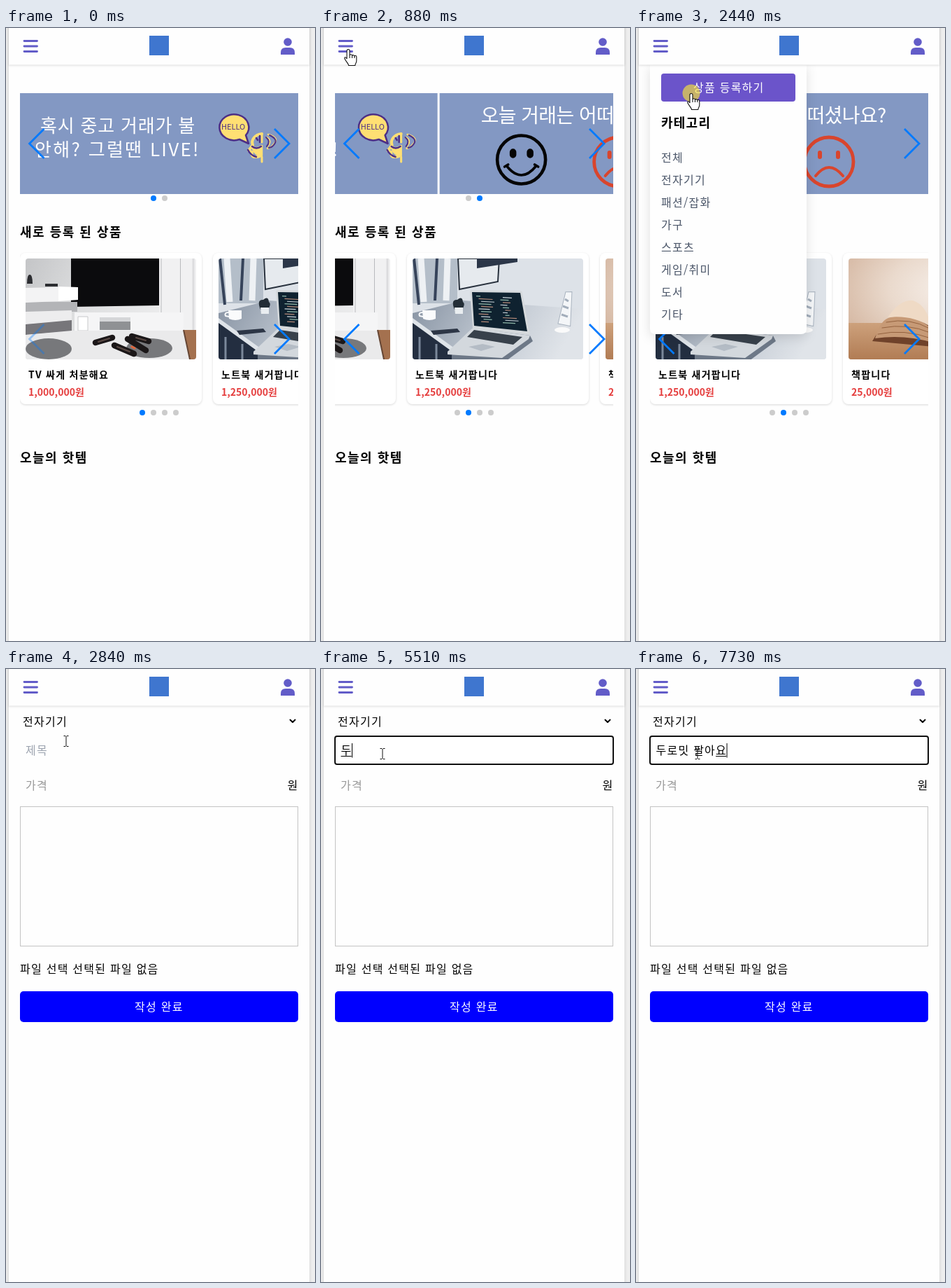
Animation, 442 px wide and 875 px high, one loop 8 s. Source, as an HTML page:

```html
<!DOCTYPE html>
<html lang="ko">
<head>
<meta charset="utf-8">
<title>중고 거래</title>
<style>
html, body { margin: 0; width: 100%; height: 100%; overflow: hidden; background: #efefef; }
svg { display: block; width: 100%; height: 100%; }
text { font: 16px "Noto Sans CJK KR", "Noto Sans KR", sans-serif; letter-spacing: 1.25px; white-space: pre; }
.head { font-size: 18px; font-weight: 700; }
.wide { letter-spacing: 1.5px; }
.title { font-size: 14px; font-weight: 700; }
.price { font-size: 14px; font-weight: 700; letter-spacing: 0; fill: #e53e3e; }
.items { fill: #4a5568; }
.pen { font-weight: 300; fill: #fff; }
.line { fill: none; stroke-linecap: round; stroke-linejoin: round; }
.arrow { fill: none; stroke: #007aff; stroke-width: 2.8; }
.card { filter: drop-shadow(0 1px 1.5px rgba(0, 0, 0, .15)); }
.page { filter: drop-shadow(0 0 3px rgba(0, 0, 0, .12)); }
.bar { filter: drop-shadow(0 1px 1.5px rgba(0, 0, 0, .14)); }
.sheet { filter: drop-shadow(0 4px 8px rgba(0, 0, 0, .12)); }

/* one loop is 8 s, so 1% is 80 ms */
.a { animation: 8s step-end infinite; }
.banners { animation-name: banners; }
.cards { animation-name: cards; }
.lose { animation-name: lose; }
.gain { animation-name: gain; }
.wake { animation-name: wake; }
.home { animation-name: home; }
.menu { animation-name: menu; }
.form { animation-name: form; }
.focus { animation-name: focus; }
.cursor { animation-name: move; animation-timing-function: ease-in-out; }
.ring { animation-name: ring; }
.tip { animation-name: tip; }
.hand { animation-name: hand; }
.beam { animation-name: form; }
@keyframes banners {
  0% { transform: none; }
  9.65% { transform: none; animation-timing-function: ease; }
  13.4%, 100% { transform: translateX(-401px); }
}
@keyframes cards {
  0% { transform: none; }
  9.65% { transform: none; animation-timing-function: ease; }
  13.4%, 100% { transform: translateX(-276px); }
}
@keyframes lose { 0% { fill: #007aff; } 9.65%, 100% { fill: #ccc; } }
@keyframes gain { 0% { fill: #ccc; } 9.65%, 100% { fill: #007aff; } }
@keyframes wake { 0% { opacity: .35; } 9.65%, 100% { opacity: 1; } }
@keyframes home { 0% { opacity: 1; } 32.125%, 100% { opacity: 0; } }
@keyframes form { 0% { opacity: 0; } 32.125%, 100% { opacity: 1; } }
@keyframes menu { 0% { opacity: 0; } 16.25% { opacity: 1; } 32.125%, 100% { opacity: 0; } }
@keyframes focus { 0% { opacity: 0; } 45.625%, 100% { opacity: 1; } }
@keyframes ring {
  0%, 16.25%, 32.125%, 47.25%, 100% { opacity: 0; }
  14.625%, 30.5%, 45.625% { opacity: .62; }
}
@keyframes tip { 0% { opacity: 0; } .875% { opacity: 1; } 9.6%, 100% { opacity: 0; } }
@keyframes hand { 0% { opacity: 0; } 9.6% { opacity: 1; } 32.125%, 100% { opacity: 0; } }
@keyframes move {
  0%, .875% { transform: translate(414px, 848px); }
  10.125%, 18.75% { transform: translate(39px, 30px); }
  23.875%, 32.12% { transform: translate(79px, 93px); }
  32.125%, 35.5% { transform: translate(86px, 103px); }
  36.375%, 39.6% { transform: translate(87px, 102px); }
  43.125%, 100% { transform: translate(88px, 121px); }
}
</style>
</head>
<body>
<svg viewBox="0 0 442 875" preserveAspectRatio="none">
  <defs>
    <clipPath id="bannerClip"><rect x="20" y="93" width="398" height="144"/></clipPath>
    <clipPath id="cardClip"><rect x="20" y="313" width="398" height="240"/></clipPath>
    <clipPath id="photoClip"><rect width="244" height="144" rx="4"/></clipPath>
    <linearGradient id="wall" y2=".3"><stop stop-color="#c4c5c7"/><stop offset=".4" stop-color="#dddedf"/><stop offset="1" stop-color="#efeff0"/></linearGradient>
    <linearGradient id="desk" x2="1" y2=".2"><stop stop-color="#8793a3"/><stop offset=".5" stop-color="#bcc4ce"/><stop offset="1" stop-color="#e0e4e9"/></linearGradient>
    <radialGradient id="warm" cx=".62" cy=".3" r=".75"><stop stop-color="#f8f1ec"/><stop offset=".5" stop-color="#eadacd"/><stop offset="1" stop-color="#d3b49e"/></radialGradient>
    <linearGradient id="wood" x2="0" y2="1"><stop stop-color="#cda17c"/><stop offset="1" stop-color="#b17c54"/></linearGradient>
    <path id="prev" d="M54.500 144L33.500 165L54.500 186"/>
    <path id="next" d="M384 144L405 165L384 186"/>
  </defs>

  <rect class="page" x="4" y="-5" width="430" height="890" fill="#fefefe"/>

  <g class="a home">
    <g clip-path="url(#bannerClip)">
      <g class="a banners">
        <rect x="20" y="93" width="398" height="144" fill="#8398c3"/>
        <text class="pen" x="49" y="149" style="font-size:26px;letter-spacing:.8px">혹시 중고 거래가 불</text>
        <text class="pen" x="41" y="183" style="font-size:26px;letter-spacing:2.300px">안해? 그럴땐 LIVE!</text>
        <g class="line" stroke="#4d2f86" stroke-width="2.500">
          <path d="M334 159L347 165L343 153A21 18.500 0 1 0 334 159Z" fill="#ffdf73"/>
          <path d="M366 151C356 152 350 160 353 167L347 175L352 177C350 185 356 185 363 183" stroke="#ffdf73" stroke-width="4"/>
          <path d="M366 151V163M366 184V191" stroke="#ffdf73" stroke-width="3"/>
          <path d="M352 169Q359 174 366 168V182Q355 182 352 169Z" fill="#ffdf73" stroke="#ffdf73"/>
          <path d="M358 157l2 3M346 174q4 8 12 10M363 154v9M352 169q6 5 13 0"/>
          <path d="M373 156q8 5 1 13M375 152q14 4 10 11t-11 9" stroke="#ffdf73"/>
          <path d="M372 156q7 6 1 13M377 153q11 5 8 11t-9 7" stroke-width="2"/>
        </g>
        <text x="308" y="145" fill="#4d2f86" style="font-size:11px;font-weight:500;letter-spacing:0">HELLO</text>
        <rect x="421" y="93" width="398" height="144" fill="#8398c3"/>
        <g transform="translate(401)">
          <text class="pen" x="79" y="135" style="font-size:28px;letter-spacing:-.6px">오늘 거래는 어떠셨나요?</text>
          <g class="line" stroke="#050505" stroke-width="4.600">
            <circle cx="137" cy="188" r="34.500"/>
            <path d="M116 197Q137 223 158 197M113 198l5-3M156 195l5 3" stroke-width="3.600"/>
            <path d="M125 177v4M149.500 177v4" stroke-width="9.500"/>
          </g>
          <g class="line" stroke="#d9452d" stroke-width="4.800">
            <circle cx="276" cy="191" r="35"/>
            <path d="M257 211Q276 187 296 211" stroke-width="4"/>
            <path d="M263 178v6M289 178v6" stroke-width="6"/>
          </g>
        </g>
      </g>
    </g>
    <g class="arrow"><use href="#prev"/><use href="#next"/></g>
    <circle class="a lose" cx="211" cy="243" r="4"/>
    <circle class="a gain" cx="227" cy="243" r="4"/>

    <text class="head wide" x="20" y="298">새로 등록 된 상품</text>

    <g clip-path="url(#cardClip)">
      <g class="a cards">
        <g transform="translate(20 321)">
          <rect class="card" width="260" height="216" rx="8" fill="#fff"/>
          <g transform="translate(8 8)" clip-path="url(#photoClip)">
            <rect width="244" height="144" fill="url(#wall)"/>
            <path d="M191 0h53v110h-53z" fill="#f1f1f2"/>
            <path d="M194 0v100M221.500 0v105" stroke="#b9babd"/>
            <path d="M240 0v110" stroke="#dcdcde" stroke-width="3"/>
            <path d="M65 0H191V67L65 69Z" fill="#0b0b0d"/>
            <path d="M70 77H226V104H70Z" fill="#f5f5f6"/>
            <path d="M0 62H74V76H0Z" fill="#b3b4b7"/>
            <path d="M0 76L66 74V90L0 94Z" fill="#ededee"/>
            <path d="M0 94L66 88V104L0 109Z" fill="#77767a"/>
            <path d="M0 42L47 41V61L0 63Z" fill="#f3f3f4"/>
            <path d="M47 40L75 41V59L47 61Z" fill="#fff"/>
            <path d="M2 36q0-13 4-13t4 13zM28 36h18v4H28z" fill="#2c2d31"/>
            <path d="M75 83h14v20H75z" fill="#fff" stroke="#c7c8ca"/>
            <path d="M106 84h44v18h-44z" fill="#8f9194"/>
            <path d="M106 84h44v6h-44z" fill="#d5d6d8"/>
            <path d="M0 109L66 103H228L234 144H0Z" fill="#eaeaeb"/>
            <path d="M226 102H244V144H235Z" fill="#a4714f"/>
            <path d="M226 102L235 144" stroke="#654634" stroke-width="2"/>
            <ellipse cx="33" cy="129" rx="33" ry="15" fill="#77787b"/>
            <ellipse cx="177" cy="128" rx="33" ry="14" fill="#77787b"/>
            <path class="line" d="M100 120L124 113M127 124L155 136M146 115L172 131M152 111L176 118" stroke="#1b1718" stroke-width="8.500"/>
            <path class="line" d="M104 119l16-5M158 113l14 4M131 126l18 7" stroke="#5b4a45" stroke-width="2"/>
            <path class="line" d="M152 126l4 2" stroke="#e2653a" stroke-width="3"/>
          </g>
          <text class="title" x="12" y="179">TV 싸게 처분해요</text>
          <text class="price" x="12" y="204">1,000,000원</text>
        </g>
        <g transform="translate(296 321)">
          <rect class="card" width="260" height="216" rx="8" fill="#fff"/>
          <g transform="translate(8 8)" clip-path="url(#photoClip)">
            <rect width="244" height="144" fill="#dde2e8"/>
            <path d="M0 0H64V64H0Z" fill="#b4bec9"/>
            <path d="M2 0L9 66M35 0L32 60" stroke="#36435a" stroke-width="4"/>
            <path d="M12 0L16 62M50 0L48 60" stroke="#eef1f4" stroke-width="9"/>
            <path d="M65 0H124L122 33L67 44Z" fill="#e6eaee" stroke="#28313d" stroke-width="2"/>
            <path d="M92 0H150V5L92 14Z" fill="#2b3648"/>
            <path d="M0 78L72 60L244 72V144H0Z" fill="url(#desk)"/>
            <path d="M0 90L74 144H0Z" fill="#232e40"/>
            <path d="M0 85L82 144H72L0 92Z" fill="#dfe4e9"/>
            <path d="M10 112V144M34 122V144" stroke="#7b889a" stroke-width="3"/>
            <path d="M60 73q-6-15 4-14q7-6 8 3q4 2-1 11z" fill="#232d36"/>
            <path d="M60 70h12v9h-11z" fill="#e9edf0"/>
            <path d="M14 74H33V86Q24 90 15 86Z" fill="#fafbfc"/>
            <path class="line" d="M14 77q-6 0-4 5l5 1" stroke="#fafbfc" stroke-width="2"/>
            <path d="M26 103L64 100L68 105L30 109Z" fill="#2d3646"/>
            <path d="M56 138L86 99L168 110L172 118L134 146L56 144Z" fill="#6d7887"/>
            <path d="M50 133L86 99L168 110L166 115L128 142L50 137Z" fill="#d3d8dd"/>
            <path d="M78 112L88 102L157 112L144 123Z" fill="#38414b"/>
            <path d="M80 126L100 122L118 126L98 132Z" fill="#b4bcc5"/>
            <path d="M82 47Q83 44 86 45L153 46Q157 46 157 49L168 109L86 100Z" fill="#d5d9dc"/>
            <path d="M85 48L154 49L164 104L88 96Z" fill="#0f2230"/>
            <g id="code" transform="rotate(3 90 54)"/>
            <path d="M217 48L226 47L228 96L210 94Z" fill="#f4f6f8" stroke="#a9b3bf" transform="rotate(5 220 70)"/>
            <path d="M218 58l5 3M215 68l8 3M213 80l9 3" stroke="#a3aebb" stroke-width="3"/>
            <ellipse cx="214" cy="102" rx="11" ry="4" fill="#fafafa"/>
          </g>
          <text class="title" x="12" y="179">노트북 새거팝니다</text>
          <text class="price" x="12" y="204">1,250,000원</text>
        </g>
        <g transform="translate(572 321)">
          <rect class="card" width="260" height="216" rx="8" fill="#fff"/>
          <g transform="translate(8 8)" clip-path="url(#photoClip)">
            <rect width="244" height="144" fill="url(#warm)"/>
            <path d="M0 92H244V144H0Z" fill="url(#wood)"/>
            <path d="M34 118L50 92L114 84L190 92L214 118L122 126Z" fill="#70422a"/>
            <path d="M38 114Q46 86 60 84Q92 78 116 98L120 120Q80 108 38 114Z" fill="#c79a76"/>
            <path d="M56 84Q74 58 92 60Q112 66 118 98Q92 80 56 84Z" fill="#efdac5"/>
            <path d="M120 120L116 98Q126 62 148 60Q170 64 182 86L208 113Q164 108 120 120Z" fill="#dfc1a3"/>
            <path class="line" d="M42 108Q80 100 118 114M48 99Q84 92 117 106M54 91Q88 84 116 100" stroke="#94623f"/>
          </g>
          <text class="title" x="12" y="179">책팝니다</text>
          <text class="price" x="12" y="204">25,000원</text>
        </g>
      </g>
    </g>
    <g class="arrow" transform="translate(0 279)">
      <use class="a wake" href="#prev"/><use href="#next"/>
    </g>
    <g fill="#ccc">
      <circle class="a lose" cx="195" cy="549" r="4"/>
      <circle class="a gain" cx="211" cy="549" r="4"/>
      <circle cx="227" cy="549" r="4"/>
      <circle cx="243" cy="549" r="4"/>
    </g>
    <text class="head wide" x="20" y="620">오늘의 핫템</text>
  </g>

  <g class="a menu">
    <path class="sheet" d="M20 53H244V429Q244 437 236 437H28Q20 437 20 429Z" fill="#fefefe"/>
    <rect x="36" y="65" width="192" height="40" rx="4" fill="#6b54ca"/>
    <text x="82" y="91" fill="#fff">상품 등록하기</text>
    <text class="head" x="36" y="142">카테고리</text>
    <g class="items" id="items"/>
  </g>

  <g class="a form">
    <text x="24" y="81">전자기기</text>
    <path class="line" d="M406.500 72.500L410 76L413.500 72.500" stroke="#000" stroke-width="2"/>
    <rect class="a focus" x="20" y="96" width="398" height="40" rx="3" fill="#fff" stroke="#101010" stroke-width="2"/>
    <text id="hint" x="28" y="122" fill="#9ca3af">제목</text>
    <text id="typed" x="28.500" y="122"></text>
    <rect id="under" y="124" width="15" height="1"/>
    <rect id="caret" y="106" width="1" height="20.500"/>
    <text x="28" y="172" fill="#999">가격</text>
    <text x="402.500" y="172">원</text>
    <rect x="20.500" y="196.500" width="397" height="199" fill="#fefefe" stroke="#c4c4c4"/>
    <text x="20" y="434">파일 선택 선택된 파일 없음</text>
    <rect x="20" y="460" width="398" height="44" rx="5" fill="#00f"/>
    <text x="184" y="488" fill="#fff">작성 완료</text>
  </g>

  <rect class="bar" x="4" y="-10" width="430" height="62.500" fill="#fefefe"/>
  <path class="line" d="M26 18.500H44.500M26 26H44.500M26 33.500H44.500" stroke="#625cc8" stroke-width="2.800"/>
  <rect x="205" y="11" width="28" height="28" fill="#3f76cf"/>
  <g fill="#625cc8">
    <circle cx="403" cy="20" r="5.800"/>
    <path d="M393 38V35Q393 28 400 28H406Q413 28 413 35V38Z"/>
  </g>

  <g class="a cursor">
    <circle class="a ring" r="12.500" fill="#ffec32"/>
    <path class="a tip" d="M0 0V16L4 12.500L6.500 18.500L9 17.500L6.500 11.500H11.500Z" fill="#fff" stroke="#000"/>
    <path class="a hand" d="M-2 14V2.500a2 2 0 0 1 4 0V9a1.800 1.800 0 0 1 3.500 .5a1.800 1.800 0 0 1 3.300 .8a1.600 1.600 0 0 1 3 .8V17c0 3-2 4-2 6.500H.5C.5 21-4 17-5 14s1.500-3 3 0zM2 9v4M5.500 10v3M8.800 10.500V13" fill="#fff" stroke="#111" stroke-width="1.100"/>
    <path class="a beam" d="M-3.500 -7.500H-1L0 -6.500L1 -7.500H3.500M0 -6.500V6.500M-3.500 7.500H-1L0 6.500L1 7.500H3.500" fill="none" stroke="#111"/>
  </g>
</svg>
<script>
const LOOP = 8000;
const NS = "http://www.w3.org/2000/svg";
const $ = id => document.getElementById(id);

function add(parent, tag, attrs, text = "") {
  const el = document.createElementNS(NS, tag);
  for (const key in attrs) el.setAttribute(key, attrs[key]);
  el.textContent = text;
  parent.append(el);
}

["전체", "전자기기", "패션/잡화", "가구", "스포츠", "게임/취미", "도서", "기타"]
  .forEach((name, i) => add($("items"), "text", { x: 36, y: 191 + 32 * i }, name));

const tints = ["#8fb7a8", "#c9d4da", "#b58a78"];
for (let i = 0; i < 22; i++) {
  const row = i >> 1;
  add($("code"), "rect", {
    x: 91 + (i % 2) * 33 + row * .7 + (i * 5) % 7, y: 53 + row * 3.6,
    width: 6 + (i * 7) % 15, height: 1.2, fill: tints[i % 3]
  });
}

// when each keystroke lands, and the field's value after it
const keys = [
  [4980, "ㄷ"], [5510, "두"], [6110, "둘"], [6180, "두로"], [6250, "두롬"],
  [6380, "두로미"], [6650, "두로밋"], [6850, "두로밋 "], [7050, "두로밋 ㅍ"],
  [7120, "두로밋 파"], [7250, "두로밋 팔"], [7320, "두로밋 팔ㅇ"],
  [7390, "두로밋 팔아"], [7520, "두로밋 팔앙"], [7730, "두로밋 팔아요"]
];
const typed = $("typed");
const show = (id, on) => $(id).setAttribute("opacity", on ? 1 : 0);
const widthOf = n => n ? typed.getSubStringLength(0, n) : 0;

let start;
function draw(now) {
  start ??= now;
  const t = (now - start) % LOOP;
  const value = keys.reduce((last, [at, text]) => t >= at ? text : last, "");
  if (typed.textContent !== value) typed.textContent = value;

  const n = value.length;
  $("caret").setAttribute("x", 28 + widthOf(n));
  $("under").setAttribute("x", 28.5 + widthOf(Math.max(0, n - 1)));
  show("hint", !n);
  show("under", n && !value.endsWith(" "));
  show("caret", t >= 3650 && !(t >= 4180 && t < 4710));
  requestAnimationFrame(draw);
}
requestAnimationFrame(draw);
</script>
</body>
</html>
```
